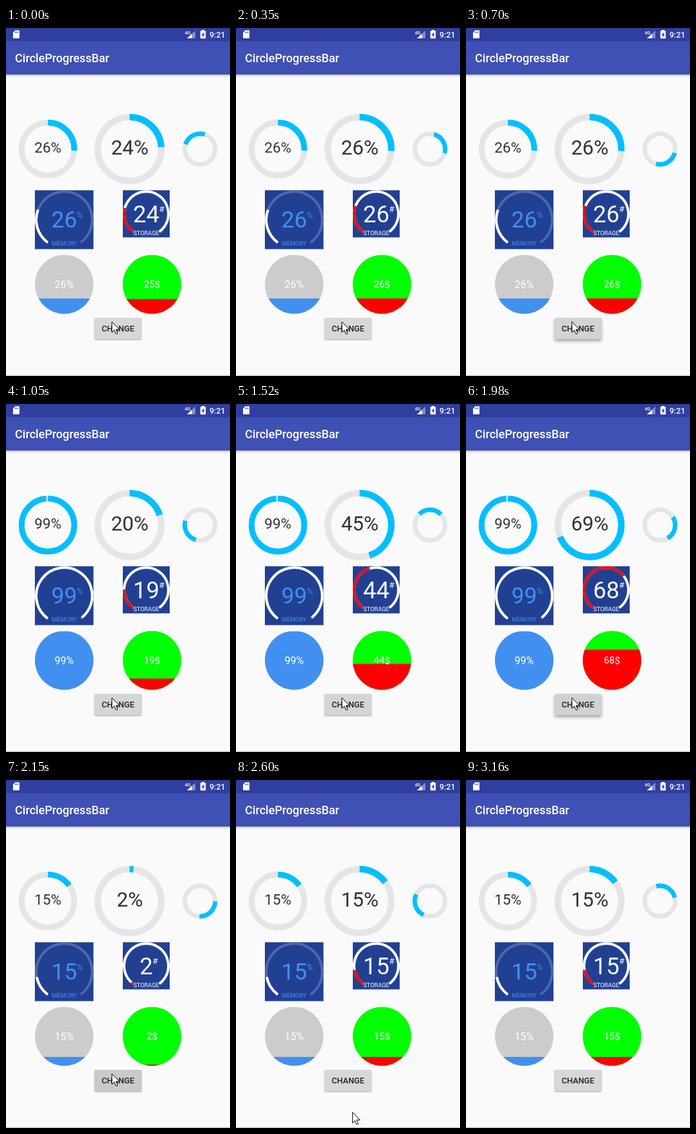
These frames come from a looping animation (349 px wide and 539 px high, 3260 ms). An HTML page:

```html
<!DOCTYPE html>
<html lang="en">
<head>
<meta charset="utf-8">
<title>Circle progress bars</title>
<style>
  html, body { margin: 0; width: 100%; height: 100%; overflow: hidden; background: #fafafa; }
  svg { display: block; width: 100%; height: 100%; }
  text { font-family: Roboto, Arial, sans-serif; }
  .mid { text-anchor: middle; }
  .bold { font-weight: 500; }
  .ring { fill: none; }
  .track { stroke: #e5e5e5; }
  .value { stroke: #00bfff; }
</style>
</head>
<body>
<svg viewBox="0 0 349 539">
  <defs>
    <linearGradient id="fade" x2="0" y2="1">
      <stop stop-color="#000" stop-opacity=".28"/>
      <stop offset="1" stop-color="#000" stop-opacity="0"/>
    </linearGradient>
    <clipPath id="clipLeft"><circle cx="90.7" cy="397" r="45.6"/></clipPath>
    <clipPath id="clipRight"><circle cx="227.5" cy="397" r="45.6"/></clipPath>
  </defs>

  <rect width="349" height="539" fill="#fafafa"/>
  <rect y="71.5" width="349" height="4.5" fill="url(#fade)"/>
  <rect y="20" width="349" height="52" fill="#3f51b5"/>
  <rect width="349" height="20.5" fill="#303f9f"/>
  <rect y="538" width="349" height="1" fill="#b8b8b8"/>

  <g fill="#fff">
    <path d="M14.5 3.5H20a1 1 0 0 1 1 1V15a1 1 0 0 1-1 1H12a1 1 0 0 1-1-1V7z"/>
    <path d="M14.5 5.5v2.6M16.6 5.5v2.6M18.7 5.5v2.6" stroke="#303f9f"/>
    <path d="M295 4V16H282z" opacity=".4"/>
    <path d="M290 8.7V16H282z"/>
    <text class="bold" x="278.5" y="9.5" font-size="7">4G</text>
    <path d="M305 4.3V3h4v1.3h1.5a.7.7 0 0 1 .7.7V15.500a.7.7 0 0 1-.7.7h-7a.7.7 0 0 1-.7-.7V5a.7.7 0 0 1 .7-.7z"/>
    <path d="M307.700 6.500l-3 4.700h2v3.300l3-4.900h-2z" fill="#303f9f"/>
    <text class="bold" x="317" y="14.5" font-size="12.500">9:21</text>
    <text class="bold" x="14" y="53" font-size="18.1">CircleProgressBar</text>
  </g>

  <g class="ring" stroke-width="9">
    <circle class="track" cx="65.3" cy="187.500" r="41"/>
    <circle class="value" id="ringLeft" cx="65.3" cy="187.500" r="41"/>
  </g>
  <g class="ring" stroke-width="10">
    <circle class="track" cx="192.500" cy="187.500" r="49.500"/>
    <circle class="value" id="ringBig" cx="192.500" cy="187.500" r="49.500"/>
  </g>
  <g class="ring" stroke-width="7">
    <circle class="track" cx="302.200" cy="187.500" r="23.700"/>
    <circle class="value" id="spinner" cx="302.200" cy="187.500" r="23.700"/>
  </g>
  <g class="mid" fill="#333">
    <text id="textLeft" x="65.300" y="193" font-size="22.600"/>
    <text id="textBig" x="192.900" y="195.500" font-size="31.500"/>
  </g>

  <rect x="45" y="251.300" width="91.300" height="91.200" fill="#224092"/>
  <g class="ring" stroke-width="4">
    <circle id="memoryTrack" cx="90.700" cy="297" r="43.600" stroke="#4d68ad"/>
    <circle id="memoryArc" cx="90.700" cy="297" r="43.600" stroke="#fff"/>
  </g>
  <g fill="#4190f0">
    <text class="mid" id="memory" x="90.700" y="309" font-size="35.500"/>
    <text id="memoryUnit" y="293.500" font-size="13">%</text>
    <text class="mid" x="90.700" y="337" font-size="9.100">MEMORY</text>
  </g>

  <rect x="182" y="251.300" width="73" height="73" fill="#224092"/>
  <g class="ring" stroke-width="4">
    <circle id="storageTrack" cx="218.500" cy="287.800" r="34.500" stroke="#fff"/>
    <circle id="storageArc" cx="218.500" cy="287.800" r="34.500" stroke="#f00"/>
  </g>
  <g fill="#fff">
    <text class="mid" id="storage" x="218.500" y="300.500" font-size="36.500"/>
    <text id="storageUnit" y="285" font-size="13.500">#</text>
    <text class="mid" x="218.500" y="321" font-size="9.200">STORAGE</text>
  </g>

  <g clip-path="url(#clipLeft)">
    <rect x="45" y="351" width="92" height="92" fill="#ccc"/>
    <rect id="fillLeft" x="45" width="92" height="92" fill="#4190f0"/>
  </g>
  <g clip-path="url(#clipRight)">
    <rect x="181" y="351" width="93" height="92" fill="#0f0"/>
    <rect id="fillRight" x="181" width="93" height="92" fill="#f00"/>
  </g>
  <g class="mid" fill="#fff">
    <text id="waterLeft" x="90.700" y="403" font-size="16"/>
    <text id="waterRight" x="227.500" y="402.300" font-size="15"/>
  </g>

  <rect id="button" x="138" y="449" width="73" height="33" rx="1.500"/>
  <text class="mid bold" x="174.500" y="470" font-size="12.800" fill="#222">CHANGE</text>
  <path id="cursor" d="M0 0V16.500L3.800 13L6.400 19L9 17.900L6.400 12H11.700Z" fill="#fff" stroke="#000"/>
</svg>

<script>
const LOOP = 3260;
const RATE = 0.053; // percent per ms
const $ = id => document.getElementById(id);

// Screen refreshes: [start, number of pictures, end]
const RUNS = [
  [0, 1, 50], [50, 9, 580], [580, 9, 1110], [1110, 9, 1640],
  [1640, 10, 2200], [2200, 10, 2770], [2770, 7, 3160], [3160, 1, LOOP]
];

const SPIN = [[0, 288], [700, 465], [1050, 555], [1520, 675], [1800, 745], [2150, 812], [3160, 1066]];
const LIFT = [[580, 0], [640, 1], [700, 1], [880, 0], [1640, 0], [1750, 1], [2050, 1], [2150, 0]];
const DARK = [[580, 0], [640, .3], [700, .3], [757, 1], [1050, .15], [1640, .15], [1800, .4], [2090, .5], [2150, 1], [2500, 0]];
const LEAVE = [[2400, 0], [2700, 1]];

function snap(t) {
  const [start, count, end] = RUNS.find(run => t < run[2]);
  const step = (end - start) / count;
  return start + step * Math.min(count - 1, Math.floor((t - start + 9) / step));
}

function at(keys, t) {
  if (t <= keys[0][0]) return keys[0][1];
  for (let i = 1; i < keys.length; i++) {
    const [t0, v0] = keys[i - 1], [t1, v1] = keys[i];
    if (t <= t1) return v0 + (v1 - v0) * (t - t0) / (t1 - t0);
  }
  return keys[keys.length - 1][1];
}

// Left column jumps to the goal, the others count up to it.
function counts(t) {
  let goal, x, gaugeLag = 0, waterLag = 0;
  if (t < 730) {
    goal = 26;
    x = 24.1 + RATE * t;
    waterLag = -1;
  } else if (t < 2120) {
    goal = 99;
    x = 20.2 + RATE * (t - 1050);
    gaugeLag = waterLag = 1;
  } else {
    goal = 15;
    x = RATE * (t - 2090);
  }
  const n = lag => Math.max(0, Math.min(goal, Math.floor(x - lag)));
  return { goal, big: n(0), gauge: n(gaugeLag), water: n(waterLag) };
}

function arc(id, from, sweep) {
  const el = $(id);
  el.setAttribute('pathLength', 360);
  el.setAttribute('stroke-dasharray', sweep + ' 400');
  el.setAttribute('transform', `rotate(${from} ${el.getAttribute('cx')} ${el.getAttribute('cy')})`);
}

const ring = (id, n) => arc(id, -90, n * 3.6);

function gauge(id, n) {
  arc(id + 'Track', 126, 288);
  arc(id + 'Arc', 126, n * 2.88);
  const label = $(id);
  label.textContent = n;
  const half = String(n).length * 0.2808 * label.getAttribute('font-size');
  $(id + 'Unit').setAttribute('x', +label.getAttribute('x') + half - 0.5);
}

function water(side, n, unit) {
  $('fill' + side).setAttribute('y', 442.6 - n * 0.912);
  $('water' + side).textContent = n + unit;
}

function button(t) {
  const lift = at(LIFT, t), dark = at(DARK, t);
  const grey = Math.round(214 - 14 * dark);
  $('button').style.fill = `rgb(${grey},${grey + 1},${grey + 1})`;
  $('button').style.filter = `drop-shadow(0 ${1 + 2 * lift}px ${0.8 + 1.7 * lift}px rgba(0,0,0,.35))`;
}

function cursor(t) {
  const k = at(LEAVE, t);
  $('cursor').setAttribute('transform', `translate(${165 + 25 * k} ${455 + 90 * k})`);
  $('cursor').style.display = k < 1 ? '' : 'none';
}

function draw(t) {
  const c = counts(t);
  ring('ringLeft', c.goal);
  ring('ringBig', c.big);
  $('textLeft').textContent = c.goal + '%';
  $('textBig').textContent = c.big + '%';
  arc('spinner', at(SPIN, t) - 90, 91);
  gauge('memory', c.goal);
  gauge('storage', c.gauge);
  water('Left', c.goal, '%');
  water('Right', c.water, '$');
  button(t);
  cursor(t);
}

const begin = performance.now();
function tick() {
  draw(snap((performance.now() - begin) % LOOP));
  requestAnimationFrame(tick);
}
tick();
</script>
</body>
</html>
```
